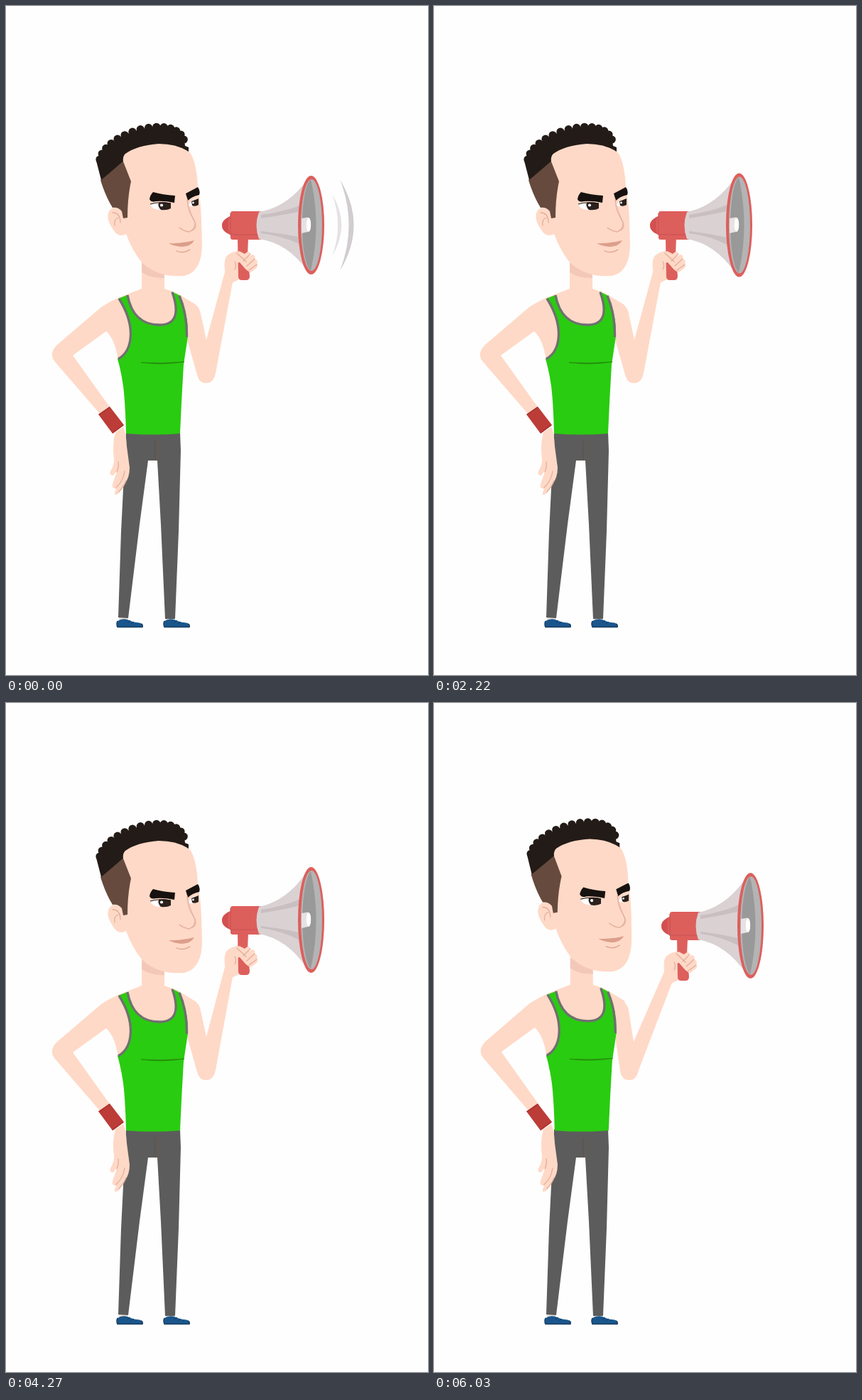
Write an HTML page that moves like this. It is 594x942 px and loops after 6100 ms.

```html
<!DOCTYPE html>
<html lang="en">
<head>
<meta charset="utf-8">
<title>Man with megaphone</title>
<style>
  html, body { margin: 0; width: 100%; height: 100%; overflow: hidden; background: #fefefe; }
  svg { display: block; width: 100vw; height: 100vh; }
  .skin { fill: #ffd9c7; }
  .red { fill: #dd5f5c; }
  .line { fill: none; stroke: #e3ae9c; stroke-width: 1.3; stroke-linecap: round; stroke-linejoin: round; }
  .trim { fill: none; stroke: #707070; stroke-width: 3.3; }
</style>
</head>
<body>
<svg viewBox="0 0 594 942">
  <defs>
    <g id="shoe">
      <path d="M159 860H171V867H159Z" fill="#e6e0d8"/>
      <path d="M157 866Q163 862 171 864Q179 868 188 868.500Q193 870 192 875H157Q155 870 157 866Z" fill="#1a568c"/>
      <path d="M157 866Q155 870 157 874.500H192Q193 871 190 870" fill="none" stroke="#173c60" stroke-width="1.5"/>
      <path d="M171 868L175 865M176 870L180 867" stroke="#123d68" stroke-width="1"/>
    </g>
  </defs>

  <g id="waves">
    <path id="innerWave" fill="#e5e1e4"/>
    <path id="outerWave" fill="#d1ccd0"/>
  </g>

  <use href="#shoe"/>
  <use href="#shoe" x="66"/>
  <path d="M169 600H245L246 626L243 740L238 863L224 863L218 730L213 640H200L188 730L172 862L158 861L162 740L165 680Z" fill="#5c5c5c"/>
  <path d="M215 612V635L210 640" fill="none" stroke="#6e5a50" stroke-width="1.3"/>
  <path d="M210 612V638" stroke="#525252" stroke-width="1"/>

  <path id="rightArm" class="skin"/>

  <g id="torso">
    <path class="skin" d="M191 355H223V398L240 404L268 421L256 470L245 500H158Q154 470 141 458L94 492L147 566L132 574L68 500Q60 489 72 477L134 424Q146 416 160 410L191 398Z"/>
    <path d="M191 361V375Q205 384 223 383V370Z" fill="#f3c8b8"/>
    <path d="M158 412L171 407C177 439 196 449 216 449C238 449 245 434 233 402L245 408Q257 434 256 465L250 505Q247 555 245 602Q207 605 169 602Q168 560 165 535Q162 514 157 497C178 485 182 450 158 412Z" fill="#29cc10"/>
    <path class="trim" d="M158 497C179 485 183 450 159 412M171 407C177 439 196 449 216 449C238 449 245 434 234 403M244 408Q255 434 254.500 466"/>
    <path d="M190 502Q220 506 251 501Q220 504 190 502Z" fill="#27870f" stroke="#27870f" stroke-width="0.8"/>
  </g>

  <path class="skin" d="M154 600L165 593Q169 600 170 620L174 650Q174 664 167 673L158 687Q152 690 153 685L155 680Q148 679 150 673L157 653L151 661Q145 661 147 655Q153 645 152 637Q149 618 154 600Z"/>
  <path class="line" d="M158 642Q159 649 156 656M155 678Q165 669 167 655M159 684Q167 675 169 668"/>
  <path d="M130 575L146 564L166 590L150 602Z" fill="#bc3c37"/>
  <path d="M131 575.500L146 565M150 601L165 590" stroke="#ad3430" stroke-width="1.6"/>

  <g id="head">
    <path class="skin" d="M165 214L174 192Q212 176 250 192L257 204Q264 212 267 228Q270 242 270 258Q274 275 275 300L276 335Q276 375 250 380Q215 383 191 361Q178 345 169 321Q158 327 151 315Q140 300 145 289Q152 279 164 289Z"/>
    <path class="line" d="M150 291Q161 291 161 305M153 309Q152 300 158 298"/>
    <path d="M133 245L165 219L176 247Q171 270 171 298L165 299L163 289Q158 283 150 284Q140 268 133 245Z" fill="#664a3d"/>
    <g id="hair" fill="#231b17">
      <path d="M134 245L127 218L132 216C142 175 250 147 252 197L257 199V205Q240 194 215 194Q185 196 168 208Q164 212 165 219Z"/>
    </g>
    <path d="M207 262Q221 266 238 267L237 277Q222 274 211 275Q204 277 202 272Q203 266 207 262Z" fill="#17120f"/>
    <path d="M253 264L270 255Q274 260 272 266Q262 268 256 274Z" fill="#17120f"/>
    <path d="M203 279Q216 275 232 278V285Q226 288 216 287Q205 286 203 279Z" fill="#fff"/>
    <path d="M215 277Q224 275 232 278V285Q227 288 218 287Q213 282 215 277Z" fill="#2b211d"/>
    <circle cx="219" cy="280.500" r="2.100" fill="#fff"/>
    <path d="M203 279Q216 275 232 278" fill="none" stroke="#17120f" stroke-width="1"/>
    <path d="M256 281Q261 272 271 271V279Q264 284 256 281Z" fill="#fff"/>
    <path d="M261 275L271 271V280Q266 283 262 281Z" fill="#2b211d"/>
    <circle cx="263.500" cy="277" r="1.400" fill="#fff"/>
    <path d="M256 273Q258 290 266 305Q268 314 258 318Q270 316 267 305Q259 290 256 273Z" fill="#eabba9"/>
    <path class="line" d="M255 272Q256 284 259 291L266 305Q267 314 258 318Q250 317 244 312"/>
    <path id="lips"/>
    <path id="teeth" fill="#fff"/>
    <path id="chin" class="line" style="stroke:#dca18d"/>
  </g>

  <g id="megaphone">
    <path class="skin" d="M308 372Q306 354 313 350Q320 345 329 345L334 352L328 385L318 390Z"/>
    <path class="red" d="M326 327H341L340 350L343 380Q343 386 338 386H332Q327 386 327 381Z"/>
    <path class="red" d="M317 295Q304 301 304 309Q304 317 317 323Z"/>
    <path d="M314 297Q304 302 304 309Q304 317 314 321Q311 309 314 297Z" fill="#d2504f"/>
    <rect class="red" x="316" y="289" width="44" height="40" rx="3"/>
    <path d="M316 292V322H357" fill="none" stroke="#c75352" stroke-width="1.200"/>
    <path id="cone" fill="#dad1d3"/>
    <path id="coneShade" fill="#c9bfc2"/>
    <ellipse id="rim" class="red" cx="429.500" cy="308.500" rx="18.500"/>
    <ellipse id="bowl" cx="430" cy="308.500" rx="15" fill="#b4b4b4"/>
    <path id="bowlShade" fill="#999"/>
    <path d="M416 299L425 297.500Q429 299 429 308Q429 317 425 318L416 320Z" fill="#e6e2e3"/>
    <ellipse cx="426" cy="308" rx="3.200" ry="10" fill="#fff"/>
    <path class="skin" d="M324 362V348Q327 343 332 347L336 349Q342 343 344 349L342 353L346 350Q352 350 350 356Q356 358 353 364Q356 367 351 370L345 375Q340 374 335 368L329 361Z"/>
    <path class="line" d="M325 348L338 360M344 349L334 359M350 356L339 366M353 364L342 372M322 360Q325 366 322 371"/>
  </g>
</svg>
<script>
const LOOP = 6100;
const $ = id => document.getElementById(id);
const draw = (id, d) => $(id).setAttribute('d', d);
const move = (id, value) => $(id).setAttribute('transform', value);
const clamp = x => Math.min(1, Math.max(0, x));
const mix = (a, b, u) => a + (b - a) * u;
const smooth = (a, b, t) => { const u = clamp((t - a) / (b - a)); return u * u * (3 - 2 * u); };
const fract = x => x - Math.floor(x);

// Spans in which the man shouts and in which he leans forward.
const SHOUTS = [[-100, 830], [2352, 3120], [4752, 5760]];
const LEANS = [[800, 1000, 1400, 1640], [3130, 3330, 3735, 3960], [5800, 5990, 7000, 7100]];
const BELL = [[0, 1], [650, 1.1], [1540, 1.05], [2920, 1.05], [3730, 1.065], [5010, 1.08], [6100, 1.07]];

// Curls follow the crown of the hair.
const CURLS = 15;
for (let i = 0; i < CURLS; i++) {
  const u = i / CURLS, v = 1 - u;
  const bezier = (a, b, c, d) => a*v*v*v + 3*b*v*v*u + 3*c*v*u*u + d*u*u*u;
  const curl = document.createElementNS('http://www.w3.org/2000/svg', 'circle');
  curl.setAttribute('cx', bezier(132, 142, 250, 252));
  curl.setAttribute('cy', bezier(216, 175, 147, 197));
  curl.setAttribute('r', 5.6);
  $('hair').append(curl);
}

function track(keys, t) {
  const i = Math.max(1, keys.findIndex(key => key[0] >= t));
  const [a, b] = [keys[i - 1], keys[i]];
  return mix(a[1], b[1], smooth(a[0], b[0], t));
}

function crescent(id, tip, height, thick) {
  const cy = 308.5, top = cy - height / 2, bottom = cy + height / 2, bulge = height * 0.302;
  draw(id, `M${tip} ${top}Q${tip + bulge} ${cy} ${tip} ${bottom}Q${tip + bulge - thick * 2} ${cy} ${tip} ${top}Z`);
}

function drawMouth(open) {
  const low = mix(339, 347, open);
  draw('lips', `M229 334Q246 ${mix(335, 332, open)} 265 330Q${mix(260, 263, open)} ${low} 247 ${low}Q235 ${low - 1} 229 334Z`);
  $('lips').setAttribute('fill', open > 0.3 ? '#c66e54' : '#db9f8b');
  const teeth = mix(336, 341, open);
  draw('teeth', open > 0.15 ? `M234 335.5Q248 336 262 333Q259 ${teeth} 249 ${teeth}Q239 ${teeth} 234 335.5Z` : '');
  const y = mix(345, 350, open);
  draw('chin', `M240 ${y}Q250 ${y + 4} 259 ${y - 2}`);
}

function drawBell(scale) {
  const cy = 308.5, ry = 69.5 * scale;
  const at = f => cy + f * ry;
  draw('cone', `M356 290Q349 309 356 328Q396 ${at(0.36)} 424 ${at(0.92)}V${at(-0.92)}Q396 ${at(-0.36)} 356 290Z`);
  draw('coneShade', `M359 294Q388 290 413 ${at(-0.39)}V${at(-0.27)}Q385 295 359 299Z
    M359 317Q386 320 413 ${at(0.24)}V${at(0.38)}Q386 323 359 320Z`);
  $('rim').setAttribute('ry', ry);
  $('bowl').setAttribute('ry', ry - 5);
  draw('bowlShade', `M429 ${at(-0.92)}A14 ${ry - 5} 0 0 0 429 ${at(0.92)}Q444 ${cy} 429 ${at(-0.92)}Z`);
}

function render(t) {
  const lean = LEANS.reduce((sum, [a, b, c, d]) => sum + smooth(a, b, t) - smooth(c, d, t), 0);
  const shout = SHOUTS.some(([a, b]) => t >= a && t < b);

  const beat = fract(t / 370);
  const bob = -3 * (smooth(0.18, 0.28, beat) - smooth(0.92, 1, beat));
  const dx = 16 * lean, dy = 8 * lean + bob, elbow = -7 * lean;

  move('torso', `translate(${lean * 0.8} ${-4.2 * lean}) scale(1 ${1 + 0.007 * lean})`);
  move('head', `translate(${1.5 * lean} ${-2.6 * lean}) rotate(${0.9 * lean} 207 380)`);
  move('megaphone', `translate(${dx} ${dy})`);
  draw('rightArm', `M240 404L266 420Q273 425 274 433L${282 - lean} ${470 + 7 * lean}
    L${309 + dx} ${371 + dy}L${319 + dx} ${389 + dy}L${295 + elbow} 517
    Q${292 + elbow} 531 ${282 + elbow} 531Q${272 + elbow} 531 ${269.5 + elbow} 521L255 470Z`);

  const gap = -Math.cos(t / 436 * 2 * Math.PI);
  drawMouth(shout ? smooth(0.35, 0.85, gap) : 0);
  drawBell(track(BELL, t));

  $('waves').style.display = shout ? '' : 'none';
  const height = 125 + 82 * fract(t / 600 + 0.08) ** 1.4;
  const grow = height - 124;
  crescent('outerWave', 470 + grow * 0.085, height, height * 0.055);
  crescent('innerWave', 459 + grow * 0.04, height * 0.68, height * 0.04);
}

const start = performance.now();
function tick() {
  render((performance.now() - start) % LOOP);
  requestAnimationFrame(tick);
}
render(0);
requestAnimationFrame(tick);
</script>
</body>
</html>
```
